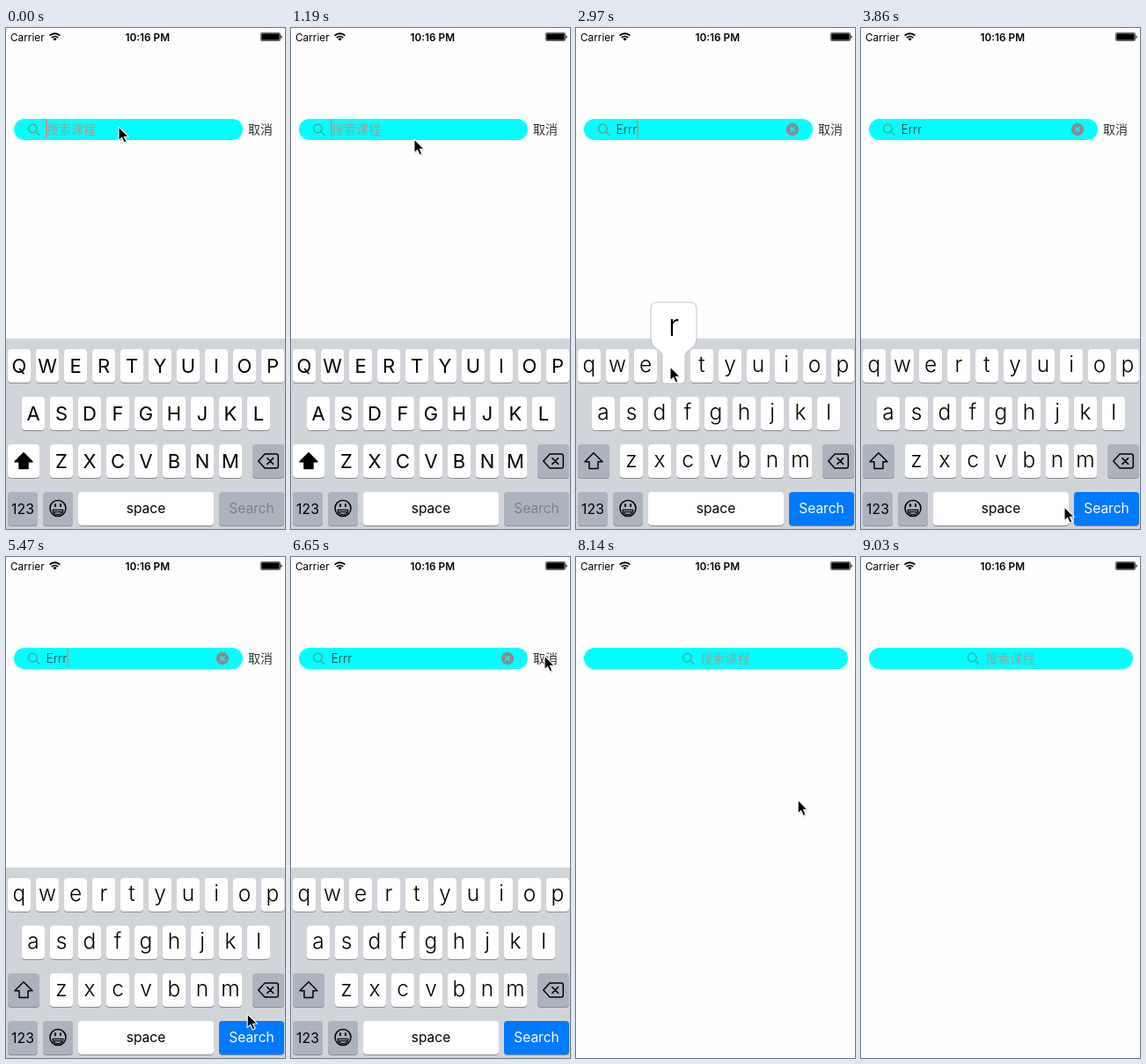
An HTML page for the animation above (9500 ms loop, 317 by 568 pixels).

```html
<!DOCTYPE html>
<html lang="zh">
<head>
<meta charset="utf-8">
<title>Search bar</title>
<style>
  html, body { margin: 0; width: 100%; height: 100%; overflow: hidden; background: #fefefe; }
  svg { display: block; width: 317px; height: 568px; }
  text { font-family: Inter, "Noto Sans CJK SC", "Noto Sans CJK", sans-serif; }
  .cjk { font-family: "Noto Sans CJK SC", "Noto Sans CJK", sans-serif; font-size: 14px; font-weight: 300; }
  .mid { text-anchor: middle; }
  .line { fill: none; stroke: #000; stroke-width: 1.5; stroke-linecap: round; stroke-linejoin: round; }
</style>
</head>
<body>
<svg viewBox="0 0 317 568">
  <rect width="317" height="568" fill="#fefefe"/>

  <g id="status">
    <text x="5" y="14.5" font-size="11.8">Carrier</text>
    <g fill="none" stroke="#000" stroke-width="1.8">
      <path d="M49.6 8.6A8.6 8.6 0 0 1 61.4 8.6"/>
      <path d="M51.8 11A5.4 5.4 0 0 1 59.2 11"/>
    </g>
    <path d="M53.4 12.4A3 3 0 0 1 57.6 12.4L55.5 14.6Z"/>
    <text class="mid" x="160.8" y="14.5" font-size="11.8" font-weight="600">10:16 PM</text>
    <rect x="289.5" y="5.5" width="22" height="9" rx="1" fill="none" stroke="#000" stroke-width=".6"/>
    <rect x="290.3" y="6.3" width="20.4" height="7.4"/>
    <path d="M312.3 8.2a2 2 0 0 1 0 3.8z"/>
  </g>

  <rect id="bar" x="9" y="103" height="24" rx="12" fill="#0ff"/>
  <g id="lens" fill="none" stroke="#748c8c" stroke-width="1.2" stroke-linecap="round">
    <circle cx="5.4" cy="114" r="4.8"/>
    <path d="M9 117.6L13 121.4"/>
  </g>
  <text id="hint" class="cjk" y="120.3" fill="#95a3a3">搜索课程</text>
  <text id="query" x="45.5" y="120" font-size="14" font-weight="300" fill="#2c3838"></text>
  <rect id="caret" y="104" width="2" height="21" fill="#b39a9e"/>
  <g id="clear">
    <circle cx="246" cy="115" r="7.2" fill="#8a8a8e"/>
    <path d="M243.4 112.4l5.2 5.2m0-5.2l-5.2 5.2" stroke="#0ff" stroke-width="1.4"/>
  </g>
  <text id="cancel" class="cjk" x="275" y="120.3" fill="#333">取消</text>

  <g id="keyboard">
    <rect y="352" width="317" height="216" fill="#d1d5da"/>
    <g id="keys"></g>
    <g id="upper" font-size="22"></g>
    <g id="lower" font-size="24.5" font-weight="300"></g>
    <path id="arrow" d="M20 481.8L30 491.8H25V499.6H15V491.8H10Z"
          stroke="#000" stroke-width="1.5" stroke-linejoin="round"/>
    <path class="line" d="M286.8 491L294 483H307Q309.3 483 309.3 485.3V496.7Q309.3 499 307 499H294Z"/>
    <path class="line" d="M296.8 487.6l6.8 6.8m0-6.8l-6.8 6.8"/>
    <g class="line">
      <circle cx="59" cy="544.5" r="9"/>
      <path d="M53 546.3H65A6 5.4 0 0 1 53 546.3ZM54.5 548.6H63.5" stroke-width="1.2"/>
      <path d="M56 540.3v1.8M62 540.3v1.8" stroke-width="2.2"/>
    </g>
    <text class="mid" x="19" y="550.5" font-size="15.8">123</text>
    <text class="mid" x="159" y="550" font-size="15.5">space</text>
    <text class="mid" id="searchText" x="279" y="550" font-size="15.5">Search</text>
    <g id="popup">
      <path d="M-13 402Q-13 403 -9 403H9Q13 403 13 399V372C13 364 26 364 26 352V318Q26 311 19 311H-19Q-26 311 -26 318V352C-26 364 -13 364 -13 372V399Z"
            fill="#fff" stroke="#a9adb3" stroke-width=".7"/>
      <text class="mid" id="popupText" y="349" font-size="34" font-weight="300"></text>
    </g>
  </g>
  <rect id="edge" y="566.7" width="317" height="1.3" fill="#c9cbcf"/>

  <g id="pointer">
    <path d="M0 0V15.6L3.6 12.3L6.1 18L8.9 16.8L6.4 11.2H11.2Z" transform="translate(.6 1.2)" fill="#000" opacity=".2"/>
    <path d="M0 0V15.6L3.6 12.3L6.1 18L8.9 16.8L6.4 11.2H11.2Z" stroke="#fff" stroke-width="1.1"/>
  </g>
</svg>
<script>
const LOOP = 9500, TICK = 148;
const NS = 'http://www.w3.org/2000/svg';
const $ = id => document.getElementById(id);

function add(parent, tag, attrs, text) {
  const el = document.createElementNS(NS, tag);
  for (const k in attrs) el.setAttribute(k, attrs[k]);
  if (text) el.textContent = text;
  return parent.appendChild(el);
}

function addKey(x, y, width, fill) {
  const box = { x, width, height: 38, rx: 4 };
  add($('keys'), 'rect', { ...box, y: y + 1, fill: '#888c91' });
  return add($('keys'), 'rect', { ...box, y, fill });
}

const GRAY = '#acb3be';
[['qwertyuiop', 2, 364], ['asdfghjkl', 18, 418], ['zxcvbnm', 50, 472]].forEach(([row, left, y]) => {
  [...row].forEach((ch, i) => {
    const x = left + i * 32;
    addKey(x, y, 26, '#fff');
    add($('upper'), 'text', { x: x + 13, y: y + 27, class: 'mid' }, ch.toUpperCase());
    add($('lower'), 'text', { x: x + 13, y: y + 25.6, class: 'mid' }, ch);
  });
});
const shiftKey = addKey(2, 472, 36, '#fff');
addKey(280, 472, 36, GRAY);
addKey(2, 526, 34, GRAY);
addKey(42, 526, 34, GRAY);
addKey(82, 526, 154, '#fff');
const searchKey = addKey(242, 526, 74, GRAY);

// Pointer stops: tick, x, y
const PATH = [
  [0, 128, 112], [4, 190, 280], [8, 140, 126], [13, 91, 378], [15, 91, 378],
  [17, 107, 384], [23, 107, 384], [26, 231, 543], [31, 274, 536], [36, 274, 536],
  [44, 279, 118], [45, 288, 112], [49, 288, 112], [56, 250, 285], [57, 250, 285], [60, 215, 541]
];
const CARET_OFF = [[4, 6], [10, 12], [24, 28], [32, 34], [38, 41], [45, 99]];
const TYPED = [15, 17, 19, 20];
const CARET_X = [45, 54, 59, 64, 69];
const CANCELLED = 49, LEFT = 61;

function pointerAt(n) {
  const i = PATH.findIndex(p => p[0] > n);
  if (i < 0) return PATH[PATH.length - 1].slice(1);
  const [a, x0, y0] = PATH[i - 1], [b, x1, y1] = PATH[i];
  const u = (n - a) / (b - a), e = u * u * (3 - 2 * u);
  return [x0 + (x1 - x0) * e, y0 + (y1 - y0) * e];
}

const show = (id, on) => { $(id).style.display = on ? '' : 'none'; };
const set = (el, name, value) => el.setAttribute(name, value);

function draw(time) {
  const n = Math.floor(time / TICK + 0.1);
  const active = n < CANCELLED;
  const count = TYPED.filter(t => n >= t).length;
  const typing = active && count > 0;

  set($('bar'), 'width', active ? 260 : 300);
  set($('lens'), 'transform', `translate(${active ? 25 : 121} 0)`);
  set($('hint'), 'x', active ? 46 : 141.5);
  show('hint', !typing);
  $('query').textContent = typing ? 'Errr'.slice(0, count) : '';
  show('clear', typing);
  show('cancel', active);

  show('caret', active && !CARET_OFF.some(([a, b]) => n >= a && n < b));
  set($('caret'), 'x', CARET_X[count]);
  set($('caret'), 'opacity', n === 34 ? 0.5 : 1);

  show('keyboard', active);
  show('upper', !count);
  show('lower', count);
  set(shiftKey, 'fill', count ? GRAY : '#fff');
  set($('arrow'), 'fill', count ? 'none' : '#000');
  set(searchKey, 'fill', count ? '#007aff' : GRAY);
  set($('searchText'), 'fill', count ? '#fff' : '#7b8088');

  const pressed = n === 14 ? 'E' : n >= 17 && n < 21 ? 'r' : '';
  show('popup', pressed);
  $('popupText').textContent = pressed;
  set($('popup'), 'transform', `translate(${pressed === 'E' ? 79 : 111} 0)`);

  show('edge', n === CANCELLED);
  show('pointer', n < LEFT);
  const [x, y] = pointerAt(n);
  set($('pointer'), 'transform', `translate(${x.toFixed(1)} ${y.toFixed(1)})`);
}

const start = performance.now();
function loop() {
  draw((performance.now() - start) % LOOP);
  requestAnimationFrame(loop);
}
loop();
</script>
</body>
</html>
```
